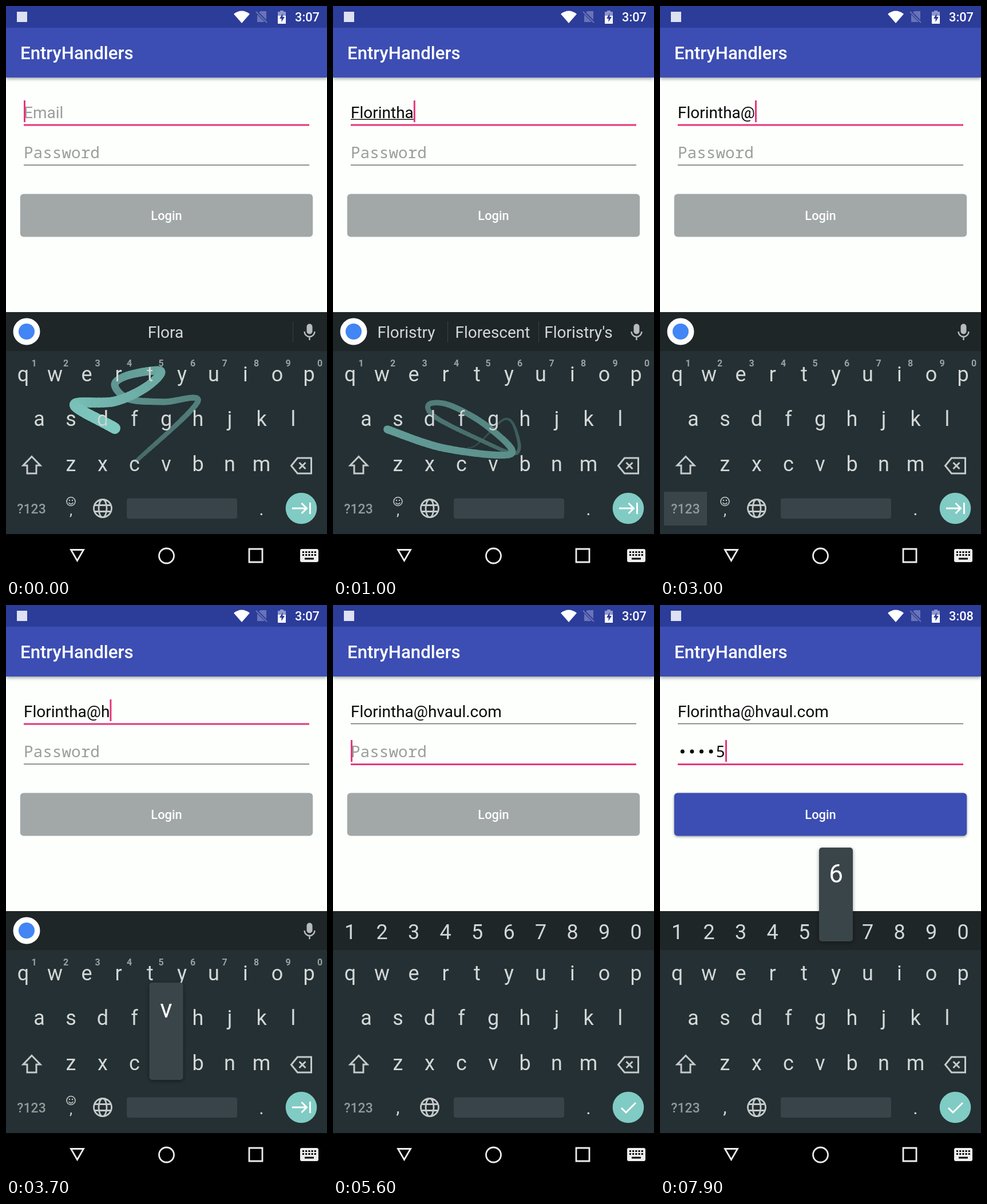
Animation, 561 px wide and 998 px high, one loop 8 s. Source, as an HTML page with a canvas:

```html
<!DOCTYPE html>
<html lang="en">
<head>
<meta charset="utf-8">
<title>Login form</title>
<style>
html, body { margin: 0; width: 100%; height: 100%; overflow: hidden; background: #fcfffc; }
canvas { display: block; }
</style>
</head>
<body>
<canvas id="stage" width="561" height="998"></canvas>
<script>
const g = document.getElementById('stage').getContext('2d');
const LOOP = 8000, COMMIT = 800, FOCUS_PASSWORD = 5400, CLOCK_TICK = 6700;
const NAME = 'Florintha';
const PINK = '#e8357c', INDIGO = '#3c4eb3', KEY = '#d3d7d7', ICON = '#c6cacb', DIM = '#929a9c';
const POP = '#3a454a', TEAL = '#80cbc4';
const SANS = 'Roboto, sans-serif', MONO = '"Noto Sans Mono", monospace';

// Key taps: character, press time, release time
const taps = [
  ['@', 2700, 2800],
  ['h', 3600, 3700], ['v', 3700, 3800], ['a', 3900, 4000], ['u', 4000, 4100], ['l', 4200, 4300],
  ['.', 4500, 4600], ['c', 4700, 4800], ['o', 4900, 5000], ['m', 5100, 5200],
  ['1', 6700, 6800], ['2', 7000, 7100], ['3', 7200, 7300], ['4', 7400, 7500],
  ['5', 7650, 7750], ['6', 7850, 8000]
];
const blinkStarts = [-200, COMMIT, FOCUS_PASSWORD, ...taps.map(k => k[2])].sort((a, b) => a - b);

// Swipe over the keys: x, y, time
const SWIPE_END = 720, FADE = 800;
const swipe = [
  [228, 795, -600], [335, 692, -460], [275, 692, -400], [215, 687, -360], [190, 662, -320],
  [215, 645, -280], [270, 638, -220], [245, 666, -190], [190, 691, -150], [120, 697, -80],
  [190, 738, 0], [240, 772, 210], [300, 722, 280], [322, 750, 340], [318, 782, 380], [250, 755, 430],
  [178, 718, 480], [168, 696, 510], [205, 698, 545], [270, 735, 590], [311, 783, 630],
  [195, 773, 680], [95, 740, SWIPE_END]
];

const digits = [...'1234567890'];
const letterRows = [[...'qwertyuiop'], [...'asdfghjkl'], [...'zxcvbnm']];
const symbolRows = [digits, [...'@#$%&-+()'], [...'*"\':;!?']];
const rowStart = [30, 58, 113.5], rowY = [643, 721, 800];
const keyX = (row, i) => rowStart[row] + i * 55.5;

const keyPos = { '.': [446.5, 878], '@': [58, 721] };
letterRows.forEach((keys, r) => keys.forEach((c, i) => keyPos[c] = [keyX(r, i), rowY[r]]));
digits.forEach((c, i) => keyPos[c] = [keyX(0, i), 564]);

function rect(x, y, w, h, color, r = 0) {
  g.fillStyle = color;
  g.beginPath();
  g.roundRect(x, y, w, h, r);
  g.fill();
}

function disc(x, y, r, color) {
  g.fillStyle = color;
  g.beginPath();
  g.arc(x, y, r, 0, 7);
  g.fill();
}

function text(s, x, y, size, color, align = 'left', weight = 400, family = SANS) {
  g.font = `${weight} ${size}px ${family}`;
  g.textAlign = align;
  g.fillStyle = color;
  g.fillText(s, x, y);
}

function fill(d, color) {
  g.fillStyle = color;
  g.fill(new Path2D(d));
}

function stroke(d, color, width = 3) {
  g.strokeStyle = color;
  g.lineWidth = width;
  g.stroke(new Path2D(d));
}

function withShadow(blur, dy, draw) {
  g.save();
  g.shadowColor = 'rgba(0,0,0,.4)';
  g.shadowBlur = blur;
  g.shadowOffsetY = dy;
  draw();
  g.restore();
}

function drawBars(t) {
  withShadow(6, 2, () => rect(0, 38, 561, 87, INDIGO));
  rect(0, 0, 561, 38, '#2c3c99');
  rect(19, 10, 18, 18, '#dde1f2');
  fill('M398 14Q412 3 426 14L412 30Z', '#fff');
  fill('M445 9H455V24L442 11ZM439 15L452 28H439Z', '#6974b7');
  stroke('M437 10L456 29', '#6974b7', 2);
  fill('M479 8h6v2h4v8h-14v-8h4z', '#8f98cc');
  rect(475, 17, 14, 14, '#fff');
  fill('M483.5 13l-5.5 9h3.5v6l5.5-9h-3.5z', '#2c3c99');
  text(t < CLOCK_TICK ? '3:07' : '3:08', 548, 27, 21.8, '#fff', 'right', 500);
  text('EntryHandlers', 25, 93, 31.2, '#fff', 'left', 500);
}

function drawForm(t) {
  const done = taps.filter(k => k[2] <= t);
  const typed = late => done.filter(k => (k[1] > FOCUS_PASSWORD) === late).map(k => k[0]).join('');
  const email = t < COMMIT ? '' : NAME + typed(false);
  const pass = typed(true);
  const onPassword = t >= FOCUS_PASSWORD;

  text(email || 'Email', 31, 196, 28, email ? '#080808' : '#9b9d9b');
  const emailEnd = email ? 31 + g.measureText(email).width : 31;
  if (email === NAME) rect(31, 197.5, emailEnd - 31, 1.6, '#111');

  if (!pass) text('Password', 31, 266, 27.7, '#9b9d9b', 'left', 400, MONO);
  for (let i = 0; i < pass.length - 1; i++) disc(39.3 + i * 16.6, 256, 3.5, '#080808');
  const passEnd = 31 + pass.length * 16.6;
  if (pass) text(pass.at(-1), passEnd - 16.6, 266, 27.7, '#080808', 'left', 400, MONO);

  [207, 277.5].forEach((y, i) => {
    if (onPassword === !!i) rect(31, y - .5, 499, 3, PINK);
    else rect(31, y - .3, 499, 1.6, '#6c6e6c');
  });

  const start = blinkStarts.filter(s => s <= t).at(-1);
  if ((t - start) % 1000 < 500) {
    if (onPassword) rect(passEnd, 236, 3, 38, PINK);
    else rect(emailEnd, 165, 3, 38, PINK);
  }

  const button = color => rect(24.8, 328.6, 511.4, 74.8, color, 6);
  if (pass) withShadow(4, 1.5, () => button(INDIGO));
  else button('#a2a8a8');
  text('Login', 280.5, 374, 21.8, '#fff', 'center', 500);
}

function drawStrip(t) {
  disc(36, 569, 23.5, '#fff');
  disc(36, 569, 14, '#4285f4');
  rect(525.5, 555.5, 10, 18, '#b7bbbc', 5);
  stroke('M521.5 569a9 9 0 0 0 18 0M530.5 578v6', '#b7bbbc', 2.5);

  const word = (s, x) => text(s, x, 580, 28, '#d5d8d8', 'center');
  const divider = x => rect(x, 551, 1, 37, '#384144');
  if (t < COMMIT) {
    word(t < 300 ? 'Flora' : t < 600 ? 'Florist' : NAME, 279);
    divider(501);
  } else if (t < 2800) {
    word('Floristry', 128);
    word('Florescent', 279);
    word("Floristry's", 429);
    divider(200);
    divider(359);
  }
}

function drawKeyboard(t) {
  const password = t >= FOCUS_PASSWORD;
  const symbols = t >= 2300 && t < 3000;
  rect(0, 535, 561, 68, '#1f2628');
  rect(0, 603, 561, 320, '#243033');

  if (password) digits.forEach((c, i) => text(c, keyX(0, i), 584, 36, KEY, 'center'));
  else drawStrip(t);

  (symbols ? symbolRows : letterRows).forEach((keys, r) =>
    keys.forEach((c, i) => text(c, keyX(r, i), rowY[r] + 12.5, 36, KEY, 'center')));
  if (!password && !symbols)
    digits.forEach((c, i) => text(c, keyX(0, i) + 19, 629.5, 16, '#9aa1a3', 'center', 700));

  if (symbols) text('=\\<', 44, 810, 23, DIM, 'center', 500);
  else stroke('M45 787.5L60 803H53V817H37V803H30Z', ICON);
  stroke('M509.5 790H533.5V817H509.5L498.5 803.5ZM512.5 798l11 11m0-11l-11 11', ICON);

  const modeHeld = t >= 2200 && t < 2400 || t >= 2900 && t < 3100;
  if (modeHeld) rect(7, 849, 75, 59, POP);
  text(symbols ? 'ABC' : '?123', 44.5, 887, 23, DIM, 'center', 500);

  if (password || symbols) text(',', 113.5, 888, 32, KEY, 'center');
  else {
    stroke('M106 866a7.5 7.5 0 1 0 15 0a7.5 7.5 0 1 0-15 0M109.5 868q4 5 8 0', ICON, 1.6);
    disc(111, 864, 1.2, ICON);
    disc(116, 864, 1.2, ICON);
    text(',', 113.5, 890, 26, KEY, 'center');
  }

  if (symbols) {
    text('1 2', 169, 875, 18, KEY, 'center', 500);
    text('3 4', 169, 894, 18, KEY, 'center', 500);
  } else {
    stroke('M153.5 878a15.5 15.5 0 1 0 31 0a15.5 15.5 0 1 0-31 0' +
      'M162 878a7 15.5 0 1 0 14 0a7 15.5 0 1 0-14 0M155 872.5h28M155 883.5h28', ICON, 2.8);
  }
  rect(211, 860.5, 193, 35.5, '#39444a', 4);
  text('.', 446.5, 890, 32, KEY, 'center');

  disc(516, 878, 27.3, TEAL);
  stroke(password ? 'M504 879l8 8 17-17' : 'M500 878H525M516.5 869l9 9-9 9M531.5 868V888', '#fff');
}

function drawSwipe(t) {
  if (t > SWIPE_END + FADE) return;
  const at = i => swipe[Math.max(0, Math.min(swipe.length - 1, i))];
  g.save();
  g.lineCap = 'round';
  g.globalCompositeOperation = 'lighten'; // keeps the key letters visible beneath
  let last = swipe[0];
  for (let i = 0; i < swipe.length - 1; i++) {
    const [a, b, c, d] = [at(i - 1), at(i), at(i + 1), at(i + 2)];
    for (let s = 1; s <= 12; s++) {
      const u = s / 12;
      const curve = k => b[k] + u / 2 * (c[k] - a[k] +
        u * (2 * a[k] - 5 * b[k] + 4 * c[k] - d[k] + u * (3 * (b[k] - c[k]) + d[k] - a[k])));
      const next = [curve(0), curve(1), b[2] + (c[2] - b[2]) * u];
      const fresh = 1 - (t - next[2]) / FADE;
      if (fresh > 0 && next[2] <= t) {
        const mix = .15 + .85 * fresh;
        g.strokeStyle = `rgb(${36 + 90 * mix},${48 + 154 * mix},${51 + 142 * mix})`;
        g.lineWidth = 2 + 18 * fresh;
        g.beginPath();
        g.moveTo(last[0], last[1]);
        g.lineTo(next[0], next[1]);
        g.stroke();
      }
      last = next;
    }
  }
  g.restore();
}

function drawPopup(t) {
  const tap = taps.find(k => t >= k[1] && t < k[2]);
  if (!tap) return;
  const [x, y] = keyPos[tap[0]], top = y - 140;
  withShadow(6, 2, () => rect(x - 29.5, top, 59, y < 600 ? 164 : 170, POP, 5));
  text(tap[0], x, top + 61, 44, '#fff', 'center');
  if (tap[0] === '.') [457, 462, 467].forEach(cx => disc(cx, 815, 1.5, '#fff'));
}

function drawNav() {
  rect(0, 923, 561, 75, '#000');
  stroke('M113.5 950.5H135.5L124.5 969.5Z', '#eee', 2.8);
  stroke('M267.5 961a13 13 0 1 0 26 0a13 13 0 1 0-26 0M425 949H448V972H425Z', '#eee', 2.8);
  rect(514, 949, 32, 23, '#eee', 3);
  for (let i = 0; i < 10; i++) rect(518 + i % 5 * 5.2, i < 5 ? 953 : 958, 3, 3, '#000');
  rect(522, 964.5, 16, 3, '#000');
}

function frame(now) {
  const t = now % LOOP;
  rect(0, 0, 561, 998, '#fcfffc');
  drawForm(t);
  drawBars(t);
  drawKeyboard(t);
  drawSwipe(t);
  drawPopup(t);
  drawNav();
  requestAnimationFrame(frame);
}
requestAnimationFrame(frame);
</script>
</body>
</html>
```
